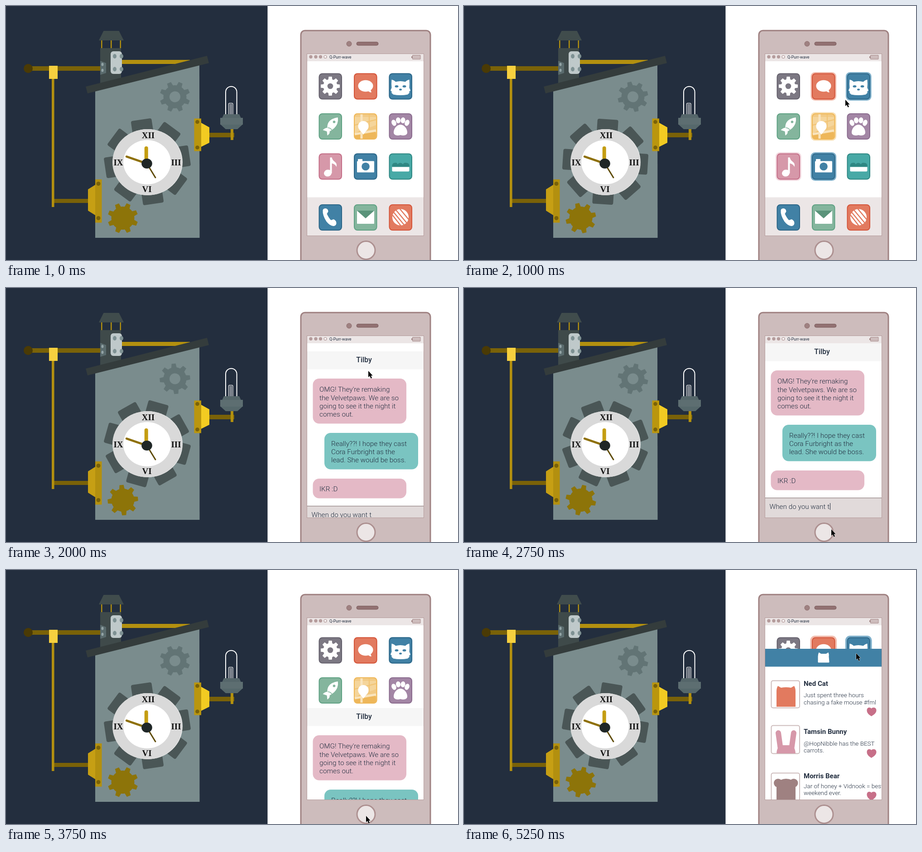
An HTML page for the animation above (5.5 s loop, 998x561 px).

```html
<!DOCTYPE html>
<html lang="en">
<head>
<meta charset="utf-8">
<title>Clockwork and phone</title>
<style>
html, body { margin: 0; width: 100%; height: 100%; overflow: hidden; background: #fff; }
svg { display: block; width: 998px; height: 561px; }
text { font-family: Roboto, sans-serif; fill: #232f40; }
.msg { font-size: 15.3px; font-weight: 300; }
.post { font-size: 13.5px; font-weight: 300; }
.name { font-size: 15px; font-weight: 700; }
.num { font: bold 19px "Liberation Serif", serif; fill: #111; text-anchor: middle; }
</style>
</head>
<body>
<svg id="stage" viewBox="0 0 998 561"></svg>
<script>
const STEP = 250, LOOP = 5500;

const rect = (x, y, w, h, fill, r = 0, more = "") =>
  `<rect x="${x}" y="${y}" width="${w}" height="${h}" rx="${r}" fill="${fill}" ${more}/>`;
const oval = (x, y, rx, ry, fill, more = "") =>
  `<ellipse cx="${x}" cy="${y}" rx="${rx}" ry="${ry}" fill="${fill}" ${more}/>`;
const dot = (x, y, r, fill, more) => oval(x, y, r, r, fill, more);
const poly = (points, fill) => `<polygon points="${points}" fill="${fill}"/>`;
const path = (d, fill = "#fff", more = "") => `<path d="${d}" fill="${fill}" ${more}/>`;
const line = (d, color, w, more = "") => path(d, "none", `stroke="${color}" stroke-width="${w}" ${more}`);
const text = (x, y, s, cls, more = "") => `<text x="${x}" y="${y}" class="${cls}" ${more}>${s}</text>`;
const lines = (x, y, gap, cls, rows) => rows.map((s, i) => text(x, y + i * gap, s, cls)).join("");

function gear(root, tip, base, top, fill) {
  let s = dot(0, 0, root, fill);
  for (let a = 0; a < 360; a += 45)
    s += `<polygon points="${-base},${2 - root} ${-top},${-tip} ${top},${-tip} ${base},${2 - root}" fill="${fill}" transform="rotate(${a})"/>`;
  return s;
}

function bigGear() {
  let s = dot(0, 0, 72, "#4a5656");
  for (let a = 0; a < 360; a += 45)
    s += rect(-23, -94, 46, 40, "#4a5656", 4, `transform="rotate(${a})"`);
  return s;
}

const GOLD = "#b3900f", DARK = "#7a6208", WALL = "#7a8c8d";

function machine() {
  return rect(0, 0, 577.5, 561, "#232e3e")
    // arm and left rod
    + rect(49, 133, 160, 10, DARK) + dot(49, 138, 10, "#4a3a05")
    + rect(101, 426, 82, 9, DARK) + rect(101, 150, 5.5, 294, GOLD)
    + rect(95, 132, 19, 29, "#f6d03f")
    // house
    + rect(254, 119, 152, 9, GOLD)
    + poly("197,188 427,130 427.5,512 197,512", WALL)
    + [211, 232, 252.5].map(x => rect(x - 1, 75, 2.5, 19, GOLD)).join("")
    + poly("205,76 215.5,55 249.5,55 260,76", "#404c4c")
    + rect(208, 93, 46, 82, "#3f4a4a")
    + poly("208,121 221,126 221,148 208,152", "#5a6b6d")
    + oval(213, 129, 2.5, 3.5, "#93a4a6") + oval(213, 142, 2.5, 3.5, "#93a4a6")
    + rect(231, 100, 25, 50, "#bfc9ca", 6)
    + [[240, 111], [255, 111], [240, 139.5], [255, 139.5]].map(p => oval(...p, 4, 5, "#7e9193")).join("")
    + poly("176,178 444,110 448,126 180,193", "#343c3c")
    // gears
    + `<g id="big">${bigGear()}</g>`
    + `<g id="grey">${gear(25.5, 33.5, 6, 4.5, "#627475")}${dot(0, 0, 12, WALL)}</g>`
    + `<g id="brass">${gear(25.5, 33.5, 6, 4.5, "#8d7409")}</g>`
    // clock
    + oval(312.8, 345, 77, 73, "#fff") + oval(312, 345, 77, 73, "#d9d9d9")
    + oval(311.5, 345, 52.5, 49, "#fff")
    + text(314, 292, "XII", "num") + text(375.5, 352, "III", "num")
    + text(311, 411, "VI", "num") + text(248, 352, "IX", "num")
    + line("M309.7 348V314", "#c49d12", 8, 'stroke-linecap="round"')
    + line("M311 348L266 332.5", "#8e7008", 4.5, 'stroke-linecap="round"')
    + line("M311 348L330.5 380", "#5e4b08", 3)
    + oval(311, 348, 11.8, 11, "#1f2626")
    // left bracket
    + poly("181,405 197,395 197,462 181,452", "#c69f14")
    + rect(197, 383, 14.5, 95.5, GOLD)
    + dot(204, 392.5, 4.5, DARK) + dot(204, 468.5, 4.5, DARK)
    // right bracket and lamp
    + rect(447, 280, 57, 10, DARK) + rect(496, 270, 6, 26, GOLD)
    + rect(415.5, 248.5, 15.5, 72, "#ba960e")
    + dot(422.5, 256, 4.3, DARK) + dot(422.5, 312.5, 4.3, DARK)
    + poly("431,258 449,268 449,302 431,311", "#f2cb22")
    + line("M485 240V190a12.3 12.3 0 0 1 24.6 0V240", "#fff", 2)
    + line("M491.5 240V217q0-2.5 2.5-2.5h4.5q2.500 0 2.500 2.500V240M494.800 240V216M497.800 240V216", "#fff", 1.2)
    + poly("481,239 515,239 519,248 477,248", "#55666a")
    + rect(473, 247, 50, 15, "#5d6e71") + poly("474,262 522,262 511,272 485,272", "#56686b");
}

const BLUE = ["#4181a5", "#2d6788"], GREEN = ["#84b59d", "#5fa183"], RED = ["#e27a5f", "#d4553a"];
const paw = (x, y, rx, ry, a) => oval(x, y, rx, ry, "#fff", `transform="rotate(${a} ${x} ${y})"`);

// Each icon: colours, glow colour if it has news, drawing in a 51 by 58 box.
const icons = [
  [["#7c7883", "#65616d"], "", `<g transform="translate(25.500 28.500)">${gear(15.500, 21, 4.500, 3.500, "#fff")}${dot(0, 0, 6.300, "#7c7883")}</g>`],
  [RED, "#f2bdae", oval(26, 28, 16.500, 12.800, "#fff") + path("M30 38q5 5 9 4q-2-3-2-8z")],
  [BLUE, "#7fb0cb", path("M6 14q5 1 9 5q10-3 21 0q4-4 9-5q1 10 0 18l2.500 6-3 3 1 2-4 4q-16 3-32 0l-4-4 1-2-3-3 2.500-6q-1-8 0-18z")
    + oval(17, 29, 4, 2.500, BLUE[0]) + oval(34, 29, 4, 2.500, BLUE[0]) + oval(25.500, 36, 3, 2, BLUE[0])],
  [GREEN, "", path("M42 9q3 17-13 28l-5 3q1 5-5 9l-1-9-9-3q5-5 10-5q-1-19 23-23z") + dot(34, 19, 2.800, GREEN[0])
    + line("M20 32q6 0 9 5", GREEN[0], 1.500)],
  [["#f2ca85", "#efb757"], "#f8e0b4", rect(2, 40, 47, 16, "#eeb75a", 5) + path("M2 8V44L49 26V8z", "#f5d59b")
    + line("M17 2V56M2 46L49 38", "#f9e4bd", 5) + line("M34 2V36M2 26L49 14", "#f2c577", 2.500)
    + dot(21, 28.500, 11.500, "#fff") + path("M11 34l10 13 10-13z")],
  [["#a386a5", "#8a6b8d"], "", paw(11, 21, 5, 7, -22) + paw(20.500, 15.500, 5, 6.500, -6) + paw(31, 15.500, 5, 6.500, 6)
    + paw(40, 21, 5, 7, 22) + path("M25.500 25c8 0 15 9 15 17 0 7-8 8-15 6-7 2-15 1-15-6 0-8 7-17 15-17z")],
  [["#d698a9", "#c46f88"], "#f2d7de", oval(20, 43.500, 8.500, 7.500, "#fff", 'transform="rotate(-18 20 43.500)"')
    + path("M25 9h4q1 6 7 10 5 4 3 11-2-6-10-8V44h-4z")],
  [BLUE, "#7fb0cb", rect(7, 17, 38, 25, "#fff", 1.500) + rect(9, 12.500, 10, 7, "#fff", 1) + dot(26, 29, 8.800, BLUE[0])],
  [["#48a9a6", "#2f8783"], "", path("M7 30v-4q1-5 6-5 5-1 6 3 6-6 12 0 2-4 7-3 6 0 7 5v4z", "#2f8783")
    + path("M7 30h38v8q0 2-2 2H9q-2 0-2-2z")],
  [BLUE, "", path("M9 13q1-4 6-4 6 1 6 7l-3 5q4 9 9 14l6-2q6 3 6 9-1 6-7 6-8-1-15-10Q8 24 9 13z")],
  [GREEN, "", rect(7, 14, 38, 29, "#fff", 1) + path("M7 14h38L26 31z", "#5a937a")],
  [RED, "", dot(25.500, 28.500, 18, "#fff")
    + line("M8 24L26 47M10 17L34 46M15 12L40 42M24 10L44 34", RED[0], 2.500)]
];

const glowing = [];
function iconGrid() {
  return icons.map(([[fill, edge], glow, art], i) => {
    const x = 690.5 + i % 3 * 77.5, y = [148.5, 237, 325.5, 438][i / 3 | 0];
    let s = "";
    if (glow) {
      glowing.push([`glow${i}`, x, y]);
      s = `<rect id="glow${i}" fill="${glow}"/>`;
    }
    return s + rect(x + 1, y + 1, 49.5, 56, fill, 7, `stroke="${edge}" stroke-width="2"`)
      + `<g transform="translate(${x} ${y})">${art}</g>`;
  }).join("");
}

const PINK = "#e4b9c6";
function chat() {
  return rect(665, 122, 257, 386, "#fff") + rect(665, 122, 257, 39.5, "#f6f6f6")
    + text(790.5, 146, "Tilby", "", 'font-size="16" font-weight="500" text-anchor="middle"')
    + rect(677.5, 182, 206.500, 99.5, PINK, 14)
    + lines(692, 211.3, 18.2, "msg", ["OMG! They're remaking", "the Velvetpaws. We are so", "going to see it the night it", "comes out."])
    + rect(703, 302, 207, 80.5, "#7ac4c1", 14)
    + lines(718, 330.5, 18.2, "msg", ["Really??! I hope they cast", "Cora Furbright as the", "lead. She would be boss."])
    + rect(677.5, 403, 206.500, 43.5, PINK, 14) + text(692, 431.3, "IKR :D", "msg")
    + rect(665, 463, 257, 45, "#e1dada") + rect(665, 463, 257, 1.2, "#8f7f7f")
    + text(674.5, 488, "When do you want t", "msg")
    + `<rect id="caret" x="808" y="475" width="1" height="15" fill="#232f40"/>`;
}

const frame = y => rect(678.5, y, 62.5, 60 + (y > 300) * 2, "#fff", 4, 'stroke="#cdbcbc" stroke-width="2"');
const heart = y => path(`M899.5 ${y + 19}c-5-3-10-7-10-13 0-7 7-8 10-4 3-4 11-3 11 4 0 6-6 10-11 13z`, "#c76f88");
const post = (title, ty, by, rows) => text(750, ty, title, "name") + lines(750, by, 15.5, "post", rows);

function feed() {
  return rect(665, 174, 257, 340, "#fff") + rect(665, 174, 257, 39.5, BLUE[0])
    + path("M781.5 203V191q0-5 2-9l5 3h11l5-3q2 5 1 9l1 12q0 1.500-1.500 1.500h-22q-1.500 0-1.500-1.500z")
    + frame(244.5) + path("M690 302V268q0-7 3-12l7 4q11-2 22 0l7-4q3 5 3 12v34z", RED[0])
    + post("Ned Cat", 256, 281, ["Just spent three hours", "chasing a fake mouse #fml"]) + heart(304)
    + frame(343.5) + line("M694 360L699 396M728 360L723 396", "#d698a9", 12, 'stroke-linecap="round"')
    + path("M690 405q1-17 14-18h15q12 1 13 18z", "#d698a9")
    + post("Tamsin Bunny", 361.5, 387.5, ["@HopNibble has the BEST", "carrots."]) + heart(396)
    + frame(448.5) + dot(693.5, 470.5, 9.5, "#9f8181") + dot(728, 470.5, 9.5, "#9f8181")
    + path("M690 512V472q8-11 21-11 14 0 21 11v40z", "#9f8181")
    + post("Morris Bear", 460, 481.5, ["Jar of honey + Vidnook = best", "weekend ever."]) + heart(490);
}

function phone() {
  return rect(651, 54.2, 286, 540, "#cdbcbc", 9, 'stroke="#9f8181" stroke-width="3"')
    + dot(757.5, 83.5, 5.5, "#9f8181", 'stroke="#8a6b6b"')
    + rect(774, 79.5, 48, 7.5, "#927172", 4, 'stroke="#7a5c5c"')
    + dot(795, 539.5, 20, "#ece6e6", 'stroke="#ad9090" stroke-width="3"')
    + rect(664.5, 105.5, 258, 402, "#fff", 0, 'stroke="#b59c9c"')
    + `<clipPath id="screen"><rect x="665" y="106" width="257" height="401"/></clipPath>`
    + `<g clip-path="url(#screen)">${rect(665, 422.5, 257, 86, "#ece6e6")}${iconGrid()}`
    + `<g id="chat">${chat()}</g><g id="feed">${feed()}</g>${rect(665, 106, 257, 16, "#ece6e6")}</g>`
    + [673, 684, 694.5].map(x => dot(x, 112.300, 3.7, "#b59c9c")).join("")
    + dot(705, 112.300, 3, "#fff", 'stroke="#b59c9c" stroke-width="1.3"')
    + text(714, 116, "Q-Purr-wave", "", 'font-size="9"')
    + rect(897.5, 108.5, 17.5, 9, "#cdbcbc", 0.5, 'stroke="#a68b8b"') + rect(895, 111, 2.5, 4, "#a68b8b");
}

const pointer = path("M0 0V14L3.200 11.200L5.600 16.800L8 15.800L5.700 10.400H9.600Z", "#000", 'stroke="#fff" stroke-width="1" paint-order="stroke"');
const get = id => document.getElementById(id);
get("stage").innerHTML = rect(0, 0, 998, 561, "#fff") + machine() + phone() + `<g id="pointer">${pointer}</g>`;

// step, x, y
const route = [[2, 870, 232], [4, 842, 207], [6, 803, 184], [7, 800, 183], [10, 800, 183], [11, 811, 533],
  [13, 795, 543], [15, 795, 543], [16, 922, 380], [17, 876, 198], [18, 872, 191], [21, 866, 184]];
// step, offset of the open chat
const slide = [[6, 390], [7, 304], [8, 18], [9, 0], [14, 0], [15, 183], [16, 390]];

function at(keys, k) {
  const i = keys.findIndex(key => key[0] >= k);
  if (i < 0) return keys[keys.length - 1].slice(1);
  if (i === 0) return keys[0].slice(1);
  const a = keys[i - 1], b = keys[i], p = (k - a[0]) / (b[0] - a[0]);
  return a.slice(1).map((v, j) => v + (b[j + 1] - v) * p);
}

const place = (id, x, y, turn = 0) =>
  get(id).setAttribute("transform", `translate(${x} ${y}) rotate(${turn})`);
const show = (id, on) => get(id).setAttribute("visibility", on ? "visible" : "hidden");

function draw(k) {
  place("big", 312, 344, -8.4 + 3 * k);
  place("grey", 373, 200.5, 22 - 9 * k);
  place("brass", 258, 468.5, 22 - 9 * k);

  const spread = 2.6 * (1 - Math.cos(Math.PI * k / 8));
  for (const [id, x, y] of glowing) {
    const box = { x: x - spread, y: y - spread, width: 51.5 + 2 * spread, height: 58 + 2 * spread, rx: 7 + spread };
    for (const name in box) get(id).setAttribute(name, box[name]);
  }

  place("chat", 0, at(slide, k)[0]);
  show("chat", k > 6 && k < 16);
  get("caret").setAttribute("opacity", k % 4 > 1 ? 1 : 0);
  show("feed", k >= 21);
  place("pointer", ...at(route, k));
  show("pointer", k >= 2);
}

let last = -1;
function tick() {
  const k = Math.floor(performance.now() % LOOP / STEP);
  if (k !== last) draw(last = k);
  requestAnimationFrame(tick);
}
tick();
</script>
</body>
</html>
```
